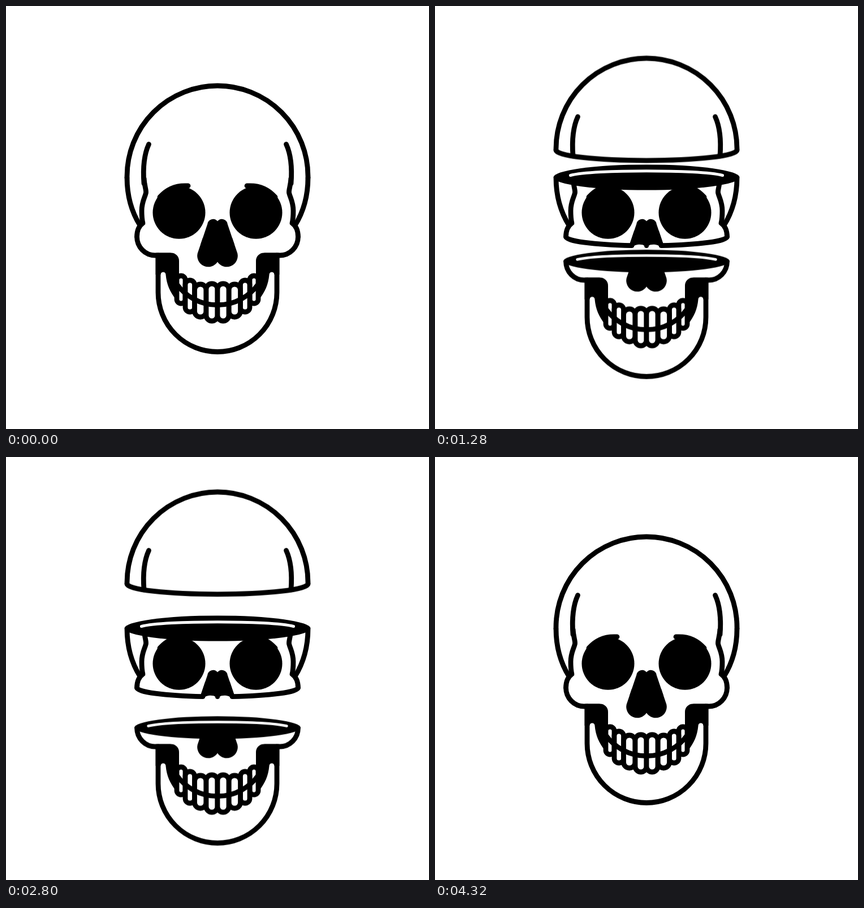
An HTML page for the animation above (5000 ms loop, 748 px wide and 748 px high).

```html
<!DOCTYPE html>
<html lang="en">
<head>
<meta charset="utf-8">
<title>Skull in three slices</title>
<style>
  html, body { margin: 0; width: 100%; height: 100%; overflow: hidden; background: #fff; }
  svg { display: block; width: 100vw; height: 100vh; }
  .line { fill: none; stroke: #000; stroke-width: 8.8; stroke-linecap: round; stroke-linejoin: round; }
  .shell { fill: #fff; }
  .ink { fill: #000; stroke: none; }
  .glint { fill: none; stroke: #fff; stroke-linecap: round; }
  .joined .seam { display: none; }
</style>
</head>
<body>
<svg id="skull" class="joined" viewBox="0 0 748 748">
  <defs>
    <g id="cheek">
      <path class="line" d="M231.5 408A32.5 33 0 0 0 264 441H290"/>
      <path class="ink" d="M264.6 436.6H292A14 14 0 0 1 306 451V522L300 518C290 506 284 492 282.5 475A4.5 4.5 0 0 0 273.5 475H264.6Z"/>
    </g>
    <g id="temple">
      <path class="line" d="M214 303.5C214 335 222 364 237 388"/>
      <path class="line" d="M244 304C244.5 318 248 324 247.5 330C246 338 240 346 240 362C240 372 241 380 242 384C235 389 231.5 397 231.5 408"/>
    </g>
    <path id="hem" class="line shell" d="M231.5 408A142.5 16 0 0 0 348 423.7L356 400"/>
    <g id="eye">
      <circle class="ink" cx="306" cy="365.3" r="46.5"/>
      <path class="line" d="M272 338C285 323 302 316.5 322 318"/>
    </g>
    <path id="hair" class="line" d="M252.5 244.5C243 265 242 288 244 314"/>
  </defs>

  <g id="jaw">
    <path class="shell" d="M231.5 408A32.5 33 0 0 0 264 441H484A32.5 33 0 0 0 516.5 408Z"/>
    <path class="line shell" d="M269 441V506.5A105 105 0 0 0 479 506.5V441"/>
    <use href="#cheek"/>
    <use href="#cheek" class="flip"/>
    <g id="teeth"></g>
    <path class="line" d="M302 492A89 89 0 0 0 446 492"/>
    <path class="ink" d="M348 410H400L409.3 437.5A19.5 19.5 0 0 1 374 452.5A19.5 19.5 0 0 1 338.7 437.5Z"/>
    <g class="seam">
      <ellipse class="ink" cx="374" cy="407.3" rx="146.9" ry="20"/>
      <path class="glint" stroke-width="4.5" d="M251.5 404.5C290 395 458 395 496.5 404.5"/>
    </g>
  </g>

  <g id="mid">
    <path class="shell" d="M214 303.5C214 335 222 364 237 388L242 384C235 389 231.5 397 231.5 408H516.5C516.5 397 513 389 506 384L511 388C526 364 534 335 534 303.5Z"/>
    <g class="seam">
      <use href="#hem"/>
      <use href="#hem" class="flip"/>
    </g>
    <use href="#temple"/>
    <use href="#temple" class="flip"/>
    <use href="#eye"/>
    <use href="#eye" class="flip"/>
    <path class="ink" d="M356.3 385.5A10 10 0 0 1 374 380.5A10 10 0 0 1 391.7 385.5L404 422Q404 428 399 427C396 420.5 380 420.5 378 424A4 4 0 0 1 370 424C368 420.5 352 420.5 349 427Q344 428 344 422Z"/>
    <g class="seam">
      <ellipse class="ink" cx="374" cy="303" rx="164.4" ry="22.6"/>
      <path class="glint" stroke-width="5" d="M239.5 299.5C280 289 468 289 508.5 299.5"/>
    </g>
  </g>

  <g id="cap">
    <path class="shell seam" d="M216 290V303.5A158 18.3 0 0 0 532 303.5V290Z"/>
    <path class="line shell" d="M214 303.5V301A160 160 0 0 1 534 301V303.5"/>
    <path class="line seam" d="M214 303.5A160 18.3 0 0 0 534 303.5"/>
    <use href="#hair"/>
    <use href="#hair" class="flip"/>
  </g>
</svg>
<script>
  const LOOP = 5000, STEP = 40, PEAK = 2400, SHUT = 4320;
  const el = id => document.getElementById(id);

  document.querySelectorAll('.flip').forEach(n => n.setAttribute('transform', 'matrix(-1 0 0 1 748 0)'));

  // left, right, top and bottom of each tooth on one side
  const TEETH = [[302, 317, 477, 526], [317, 333.5, 485, 541], [333.5, 354, 492, 550], [354, 374, 491, 557]];
  const tooth = (x, y, w, h) =>
    `<rect class="line shell" x="${x}" y="${y}" width="${w}" height="${h}" rx="${w / 2}"/>`;
  el('teeth').innerHTML = TEETH.map(([l, r, t, b]) =>
    tooth(l, t, r - l, b - t) + tooth(748 - r, t, r - l, b - t)).join('');

  const slide = (id, y) => {
    const rest = 'translateY(0px)';
    const anim = el(id).animate([
      { transform: rest, offset: 0, easing: 'cubic-bezier(.333,0,.667,1)' },
      { transform: `translateY(${y}px)`, offset: PEAK / LOOP, easing: 'cubic-bezier(.38,0,.56,1)' },
      { transform: rest, offset: SHUT / LOOP },
      { transform: rest, offset: 1 }
    ], { duration: LOOP, iterations: Infinity });
    anim.pause();
    return anim;
  };
  const slides = [slide('cap', -88.5), slide('jaw', 79.5)];

  const start = performance.now();
  function draw() {
    const t = Math.floor((performance.now() - start) % LOOP / STEP) * STEP;
    slides.forEach(a => { a.currentTime = t; });
    el('skull').classList.toggle('joined', t === 0 || t >= SHUT);
    requestAnimationFrame(draw);
  }
  draw();
</script>
</body>
</html>
```
